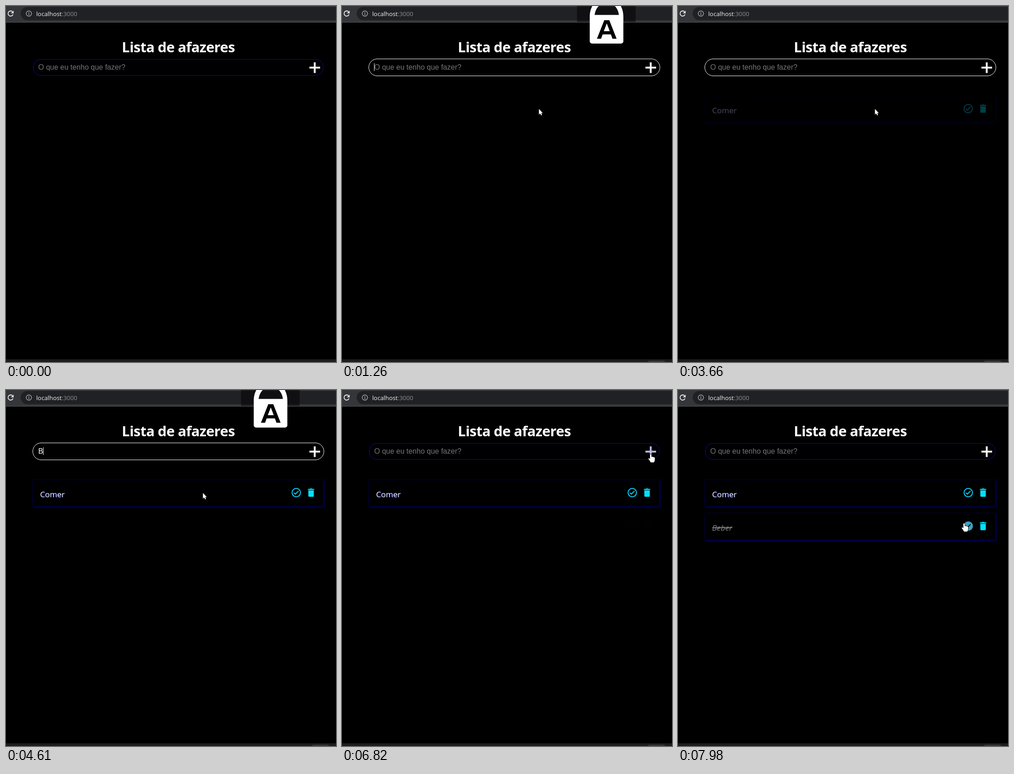
Write an HTML page that moves like this. It is 721 by 777 pixels and loops after 8000 ms.

```html
<!DOCTYPE html>
<html lang="pt">
<head>
<meta charset="utf-8">
<title>Lista de afazeres</title>
<style>
  html, body { margin: 0; width: 100%; height: 100%; overflow: hidden; background: #000; }
  svg { display: block; width: 721px; height: 777px; }
  text { white-space: pre; }
  .ui { font-family: "Open Sans", "Noto Sans", sans-serif; }
  .field { font: 16px "Liberation Sans", Arial, sans-serif; }
  .url { font-size: 13.3px; }
  .title { font-size: 30.8px; font-weight: 700; letter-spacing: -.6px; }
  .task { font-size: 17.2px; fill: #fff; text-shadow: 1px 1px 2px #00b; }
  .card { fill: #000; filter: drop-shadow(1px 1.5px 2.5px #0000a0); }
  .done .task { fill: #858585; font-style: italic; text-decoration: line-through; text-shadow: none; }
  .check { color: #0cd0fa; }
  .hover .check { color: #38a3c4; }
  .solid, .done .ring { display: none; }
  .done .solid { display: inline; }
</style>
</head>
<body>
<svg viewBox="0 0 721 777">
  <defs>
    <g id="ring" fill="none" stroke="currentColor" stroke-width="2">
      <circle r="9.2"/><path d="M-5 .3L-2 3.3L5-3.7"/>
    </g>
    <g id="solid">
      <circle r="10.2" fill="currentColor"/><path d="M-5 .3L-2 3.3L5-3.7" fill="none" stroke="#000" stroke-width="2"/>
    </g>
    <path id="trash" fill="#00e1ff" d="M-6 7a2 2 0 0 0 2 2h8a2 2 0 0 0 2-2V-5H-6zM7-8H3.5l-1-1h-5l-1 1H-7v2H7z"/>
  </defs>

  <rect width="721" height="777"/>
  <rect width="721" height="35" fill="#35363a"/>
  <rect y="35" width="721" height="1" fill="#5b5c5f"/>
  <rect x="32" y="2" width="720" height="29" rx="14.5" fill="#202124"/>
  <path d="M14.6 13A5.6 5.6 0 1 0 15.4 18.2" fill="none" stroke="#e8eaed" stroke-width="1.8"/>
  <path d="M16.6 10v6h-6z" fill="#e8eaed"/>
  <circle cx="50" cy="16.5" r="5.8" fill="none" stroke="#a5a9ad" stroke-width="1.4"/>
  <path d="M50 15.6v4.2M50 13v1.5" stroke="#a5a9ad" stroke-width="1.5"/>
  <text class="ui url" x="66" y="21.5" fill="#f1f3f4">localhost<tspan fill="#8b8e92">:3000</tspan></text>

  <text class="ui title" x="376.5" y="101" text-anchor="middle" fill="#fff">Lista de afazeres</text>

  <rect id="box" fill="#000"/>
  <text id="value" class="field" x="70.5" y="139"/>
  <rect id="caret" y="125" width="1" height="17" fill="#fff"/>
  <path id="plus" d="M663 134.4h23.2M674.5 123v23.2" stroke-width="4"/>

  <g id="tasks"></g>

  <rect y="771" width="721" height="6" fill="#1d1c1d"/>
  <path id="tray" d="M667 777q2-3 6-3h28q4 0 6 3z" fill="#363638"/>

  <g id="caps">
    <rect x="513.5" width="128" height="35" fill="#000" opacity=".5"/>
    <path fill="#fff" fill-rule="evenodd" d="M541.3 24C541.300 12 544 3 551-6H605C612 3 614.700 12 614.700 24V77a5 5 0 0 1-5 5H546.300a5 5 0 0 1-5-5zM552 19.500H605C604 10 599 1 592-3H565C558 1 553 10 552 19.500z"/>
    <path fill-rule="evenodd" d="M557 71.500L573 31H584L600 71.500H591L587.500 62H569.500L566 71.500zM572 55H585L578.500 38z"/>
    <path id="gap" d="M603 0H616V19.500H603z" fill="#111213"/>
  </g>

  <g id="cursor" fill="#fff" stroke="#000" stroke-width="1.600" paint-order="stroke">
    <path id="arrow" d="M.3.800V13L3 10.500L5 14.800L7 14L5.200 9.700H8.700z"/>
    <path id="beam" d="M-3-8H-.5L0-7.500L.5-8H3V-7H.7V7H3V8H.5L0 7.500L-.5 8H-3V7H-.7V-7H-3z"/>
    <path id="hand" d="M-1.500 1Q0-1 1.500 1V6Q3 4.700 4.200 6.300Q5.800 5.300 6.700 7Q8.500 6.300 9 8.500V12Q9 15 7 18H0Q-2 14-4.800 11Q-5.300 8.700-3.300 9L-1.500 10.500z"/>
  </g>
</svg>

<script>
const LOOP = 8000;
const $ = id => document.getElementById(id);
const set = (el, attrs) => { for (const k in attrs) el.setAttribute(k, attrs[k]); };
const show = (el, on) => el.style.display = on ? '' : 'none';
const within = (t, a, b) => t >= a && t < b;
const last = (list, t) => list.filter(k => k[0] <= t).pop();
const clamp = p => Math.min(1, Math.max(0, p));
const smooth = p => p * p * (3 - 2 * p);

// The CSS "ease" timing curve.
function ease(p) {
  if (p <= 0 || p >= 1) return clamp(p);
  const bez = (u, a, b) => 3 * u * (1 - u) ** 2 * a + 3 * u * u * (1 - u) * b + u ** 3;
  let lo = 0, hi = 1;
  for (let i = 0; i < 20; i++) {
    const mid = (lo + hi) / 2;
    if (bez(mid, .25, .25) < p) lo = mid; else hi = mid;
  }
  return bez(lo, .1, 1);
}

const tasks = [
  { text: 'Comer', y: 0, born: 3465 },
  { text: 'Beber', y: 73, born: 6810 }
];
$('tasks').innerHTML = tasks.map(({ text, y }) => `
  <g transform="translate(0 ${y})">
    <rect class="card" x="59" y="197" width="634.5" height="57"/>
    <text class="ui task" x="74.5" y="233.5">${text}</text>
    <g class="check" transform="translate(634.2 224)"><use class="ring" href="#ring"/><use class="solid" href="#solid"/></g>
    <use href="#trash" x="666.5" y="224"/>
  </g>`).join('');
const cards = [...$('tasks').children];

const typing = [
  [0, ''], [1600, 'C'], [2000, 'Co'], [2220, 'Com'], [2640, 'Come'], [2820, 'Comer'], [3490, ''],
  [4610, 'B'], [4910, 'Be'], [4990, 'Beb'], [5080, 'Bebe'], [5270, 'Beber'], [6700, '']
];
const caretOn = [[970, 1480], [1600, 3320], [3820, 4320], [4610, 5800], [6290, 6700]];
const path = [
  [70, 682, 770], [860, 317, 144], [980, 317, 144], [1240, 430, 224],
  [5780, 430, 224], [6500, 674.5, 140], [6880, 674.5, 140], [7460, 625, 291], [LOOP, 625, 291]
];

function pointer(t) {
  const i = Math.max(1, path.findIndex(k => k[0] > t));
  const [t0, x0, y0] = path[i - 1], [t1, x1, y1] = path[i];
  const p = smooth(clamp((t - t0) / (t1 - t0)));
  return [x0 + (x1 - x0) * p, y0 + (y1 - y0) * p];
}

function drawField(t) {
  const focused = within(t, 970, 6700), grow = focused ? 1 : 0;
  set($('box'), {
    x: 59.5 - grow, y: 116.5 - grow, width: 634 + 2 * grow, height: 35 + 2 * grow,
    rx: 17.5 + grow, stroke: focused ? '#fff' : '#2000b4'
  });
  const typed = last(typing, t)[1], value = $('value');
  const label = typed || 'O que eu tenho que fazer?';
  if (value.textContent !== label) value.textContent = label;
  set(value, { fill: typed ? '#fff' : '#757575' });
  set($('caret'), { x: Math.round(70.4 + (typed ? value.getComputedTextLength() : 0)) });
  show($('caret'), caretOn.some(([a, b]) => within(t, a, b)));
}

function drawPointer(t) {
  const [x, y] = pointer(t);
  const onPlus = x > 661 && within(y, 120, 149);
  const onCheck = t > 7000 && Math.hypot(x - 634, y - 297) < 13;
  const onInput = !onPlus && within(y, 116, 152);
  show($('cursor'), t >= 70);
  set($('cursor'), { transform: `translate(${x.toFixed(1)} ${y.toFixed(1)})` });
  show($('hand'), onPlus || onCheck);
  show($('beam'), onInput);
  show($('arrow'), !onPlus && !onCheck && !onInput);
  set($('plus'), { stroke: onPlus ? '#bcbce9' : '#fff' });
  cards[1].classList.toggle('hover', onCheck);
}

function draw(t) {
  drawField(t);
  drawPointer(t);
  tasks.forEach(({ born }, i) => cards[i].style.opacity = ease((t - born) / 1000));
  cards[1].classList.toggle('done', t >= 7800);
  show($('caps'), within(t, 1200, 2880) || within(t, 4420, 5780));
  show($('gap'), within(t, 1800, 2880) || within(t, 4670, 5780));
  show($('tray'), t >= 1100);
}

let start;
function tick(now) {
  start ??= now;
  draw((now - start) % LOOP);
  requestAnimationFrame(tick);
}
draw(0);
requestAnimationFrame(tick);
</script>
</body>
</html>
```
